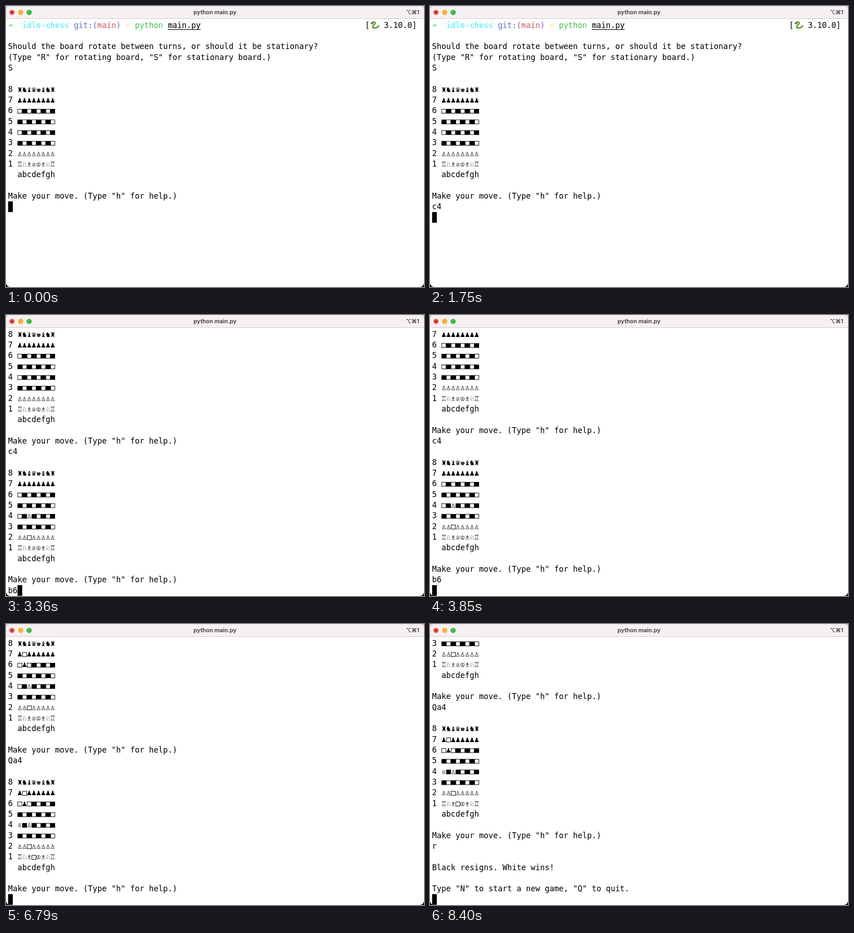
Animation, 912 px wide and 614 px high, one loop 9590 ms. Source, as an HTML page with a canvas:

```html
<!DOCTYPE html>
<html lang="en">
<head>
<meta charset="utf-8">
<title>python main.py</title>
<style>
  html, body { margin: 0; width: 100%; height: 100%; overflow: hidden; background: #000; }
  canvas { display: block; width: 912px; height: 614px; }
</style>
</head>
<body>
<canvas id="stage" width="912" height="614"></canvas>
<script>
const W = 912, H = 614, LOOP = 9590;
const ROWS = 25, CELL = 10.25, LINE = 23.33, LEFT = 4.6, TOP = 30.3, BASE = 17.5;
const MONO = '"DejaVu Sans Mono", "Liberation Mono", monospace';
const UI = 'Inter, "DejaVu Sans", sans-serif';
const ctx = document.getElementById('stage').getContext('2d');

// Terminal content: everything that is printed or typed, in order.
const MOVE = 'Make your move. (Type "h" for help.)';
const position = {};
[...'♜♞♝♛♚♝♞♜'].forEach((p, i) => { position['abcdefgh'[i] + 8] = p; });
[...'♖♘♗♕♔♗♘♖'].forEach((p, i) => { position['abcdefgh'[i] + 1] = p; });
for (const file of 'abcdefgh') {
  position[file + 7] = '♟';
  position[file + 2] = '♙';
}

function board() {
  const lines = [];
  for (let rank = 8; rank > 0; rank--) {
    const row = [...'abcdefgh'].map((file, i) =>
      position[file + rank] || ((rank + i) % 2 ? '■' : '□'));
    lines.push(rank + ' ' + row.join(''));
  }
  return [...lines, '  abcdefgh', '', MOVE];
}

function move(from, to) {
  position[to] = position[from];
  delete position[from];
  return board();
}

const log = [
  '', '',
  'Should the board rotate between turns, or should it be stationary?',
  '(Type "R" for rotating board, "S" for stationary board.)',
  'S', '',
  ...board(), 'c4', '',
  ...move('c2', 'c4'), 'b6', '',
  ...move('b7', 'b6'), 'Qa4', '',
  ...move('d1', 'a4'), 'r', '',
  'Black resigns. White wins!', '',
  'Type "N" to start a new game, "Q" to quit.', ''
];

// Cursor positions: time, line, column.
const steps = [
  [0, 17, 0], [700, 17, 1], [910, 17, 2], [1750, 18, 0],
  [1820, 30, 0], [3080, 30, 1], [3360, 30, 2], [3850, 31, 0],
  [3920, 43, 0], [5250, 43, 1], [5600, 43, 2], [6090, 43, 3], [6720, 44, 0],
  [6790, 56, 0], [7980, 56, 1], [8330, 57, 0], [8400, 61, 0]
];

const textSize = CELL / 0.602;
const font = (size, weight = 400, family = MONO) => `${weight} ${size}px ${family}`;
const colX = col => LEFT + col * CELL;

function text(str, col, y, color = '#000', weight = 400) {
  ctx.font = font(textSize, weight);
  ctx.fillStyle = color;
  ctx.fillText(str, colX(col), y + BASE);
}

function disc(x, y, r, color) {
  ctx.fillStyle = color;
  ctx.beginPath();
  ctx.arc(x, y, r, 0, Math.PI * 2);
  ctx.fill();
}

// Chess glyphs are sized to fill exactly one cell.
ctx.font = font(100);
const pieceSize = 100 * CELL / ctx.measureText('♜').width;

function drawCell(ch, col, y) {
  const x = colX(col);
  if (ch === '■') {
    ctx.fillStyle = '#000';
    ctx.fillRect(x, y + 8, CELL, 10);
  } else if (ch === '□') {
    ctx.strokeStyle = '#000';
    ctx.lineWidth = 1.1;
    ctx.strokeRect(x + 0.55, y + 8.55, CELL - 1.1, 8.9);
  } else {
    ctx.font = font(pieceSize);
    ctx.fillStyle = '#000';
    ctx.fillText(ch, x, y + BASE);
  }
}

function drawLine(str, y) {
  if (!/^\d /.test(str)) return text(str, 0, y);
  text(str[0], 0, y);
  [...str.slice(2)].forEach((ch, i) => drawCell(ch, i + 2, y));
}

function snake(x, y) {
  ctx.lineCap = ctx.lineJoin = 'round';
  ctx.strokeStyle = '#6f9f3c';
  ctx.lineWidth = 3.4;
  ctx.beginPath();
  ctx.moveTo(x + 4, y + 5);
  ctx.bezierCurveTo(x + 9, y, x + 13, y + 5, x + 9, y + 8);
  ctx.bezierCurveTo(x + 4, y + 12, x + 3, y + 16, x + 10, y + 15.5);
  ctx.bezierCurveTo(x + 15, y + 15.5, x + 17, y + 14, x + 18, y + 11);
  ctx.stroke();
  disc(x + 3.8, y + 5.2, 2.6, '#55862f');
}

function drawPrompt(y) {
  const blue = '#6668d8';
  text('➜', 0, y, '#52dc72', 700);
  text('idle-chess', 3, y, '#7cf1f5', 700);
  text('git:(', 14, y, blue);
  text('main', 19, y, '#d05a5c');
  text(')', 23, y, blue);
  text('✗', 25, y, '#fbef8c', 700);
  text('python', 27, y, '#42bd4c');
  text('main.py', 34, y);
  ctx.fillRect(colX(34), y + 20.5, 7 * CELL, 1.3);
  text('[', 76, y);
  snake(colX(77) + 1, y + 2);
  text('3.10.0]', 80, y);
}

function drawWindow() {
  ctx.fillStyle = '#d6d4d5';
  ctx.fillRect(0, 0, W, 30);
  ctx.fillStyle = '#000';
  ctx.fillRect(0, 30, W, H - 30);
  ctx.beginPath();
  ctx.roundRect(0, 0.8, W, H - 0.8, 9);
  ctx.clip();
  ctx.fillStyle = '#fff';
  ctx.fillRect(0, 0, W, H);
  ctx.fillStyle = '#f7f0f2';
  ctx.fillRect(0, 0, W, 27);
  ctx.fillStyle = '#c8c3c5';
  ctx.fillRect(0, 27, W, 1);

  disc(13, 14, 5.8, '#ed5f57');
  disc(13, 14, 2, '#7c120d');
  disc(32, 14, 5.8, '#f3b13c');
  disc(50.5, 14, 5.8, '#3dbd49');

  ctx.fillStyle = '#3d393b';
  ctx.font = font(12.5, 600, UI);
  ctx.textAlign = 'center';
  ctx.fillText('python main.py', 456, 18);
  ctx.font = font(12, 600, UI);
  ctx.textAlign = 'right';
  ctx.fillText('⌥⌘1', 901.5, 17.5);
  ctx.textAlign = 'left';
}

function draw(time) {
  const [, line, col] = steps.findLast(step => step[0] <= time);
  const first = Math.max(0, line - ROWS + 1);
  const rowY = i => TOP + (i - first) * LINE;

  ctx.save();
  drawWindow();
  if (first === 0) drawPrompt(rowY(0));
  for (let i = first; i < line; i++) drawLine(log[i], rowY(i));
  text(log[line].slice(0, col), 0, rowY(line));
  ctx.fillStyle = '#000';
  ctx.fillRect(colX(col), rowY(line), CELL, LINE);
  ctx.restore();
}

const start = performance.now();
function tick() {
  draw((performance.now() - start) % LOOP);
  requestAnimationFrame(tick);
}
tick();
</script>
</body>
</html>
```
